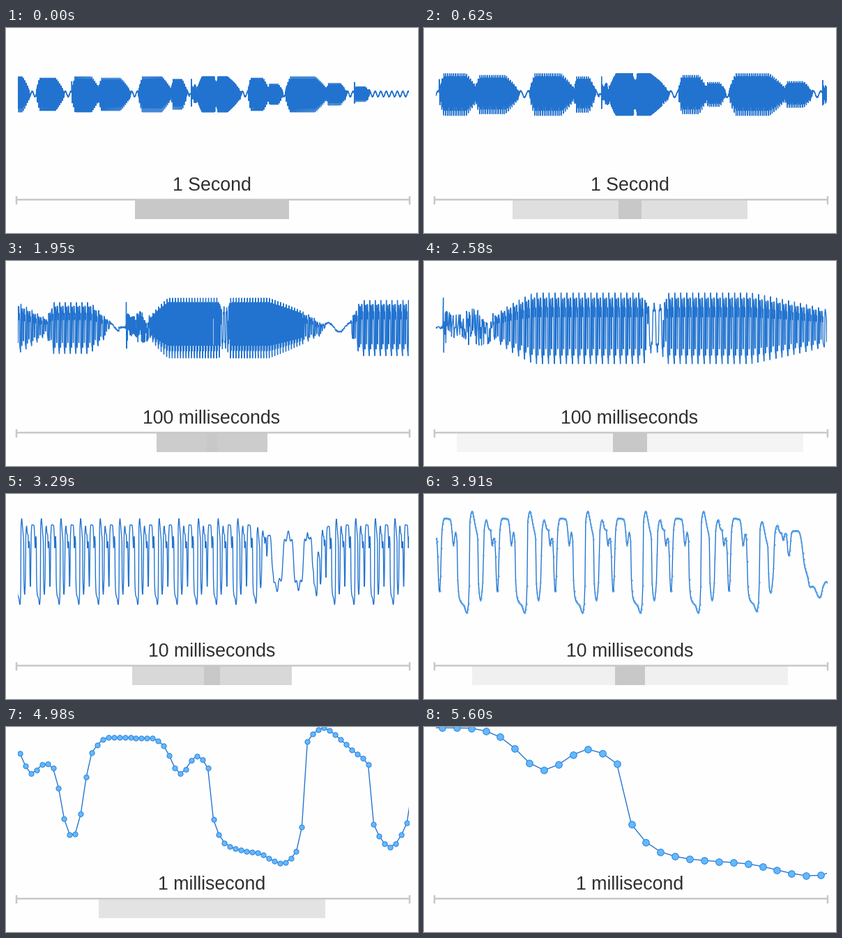
Write a matplotlib script that moves like this. It is 591x295 px and loops after 5690 ms.

```python
import numpy as np
import matplotlib.pyplot as plt
from matplotlib.animation import FuncAnimation
from matplotlib.patches import Rectangle

W, H, DPI = 591, 295, 100
LOOP, STEPS, TICKS = 5690, 64, 3    # ms, poses per loop, ticks per pose
PX = 72 / DPI                       # points per pixel
MID = 297.5                         # x that the zoom closes in on
LEFT, RIGHT, RULE_Y = 15, 580, 247.3
BLUE, DOT, RIM = "#2273cf", "#62b9fc", "#2e82dc"
GREY, INK = "#c8c8c8", "#2f2f32"
LABELS = ["1 Second", "100 milliseconds", "10 milliseconds", "1 millisecond"]

# Zoom: pixels per sample and width of the one-second box at some poses
KEYS = np.array([0, 13, 29, 37, 44, 56, 63])
RATIO = 10.3                        # size ratio of neighbouring boxes
LOG_SCALE = np.log([0.0124, 0.023, 0.106, 0.348, 1.025, 7.93, 20.9])
LOG_BOX = (np.log([221, 524, 496, 229, 453, 325, 900])
           + np.log(RATIO) * np.array([0, 0, 1, 2, 2, 3, 3]))

PERIOD = 81                         # samples in one pitch cycle
CYCLE = [(-35, .60), (-33, .30), (-30.5, .45), (-29, .38), (-26, -.59), (-25, -.58),
         (-22, .61), (-19, .83), (-11, .82), (-9, .71), (-6, .30), (-3, .56),
         (-1, .38), (0, -.37), (2, -.71), (4, -.80), (8, -.86), (12.5, -1.01),
         (15, -.84), (16, -.48), (17, .77), (20, .97), (22, .87), (25, .65),
         (28, .43), (29, -.44), (32, -.77), (35, -.42), (37, .60), (40, .80),
         (43.5, .62), (46, .60)]

# Start and end in thousands of samples, loudness
SYLLABLES = [(-24, -21.2, 1), (-20.5, -17.2, .92), (-16.4, -13, 1),
             (-13.4, -9.5, .92), (-8.7, -4.7, 1), (-4.9, -3, .85), (-1.95, 3.3, 1),
             (4, 6.6, .92), (6.3, 8.1, .58), (8.3, 13.4, 1), (13, 15.5, .62),
             (16.3, 18.2, .42)]
BURSTS = [-16.4, -2.55, 16.3]


def curve(x, xs, ys):
    """Smooth curve through key points that never overshoots them."""
    xs, ys = np.asarray(xs, float), np.asarray(ys, float)
    gap = np.diff(xs)
    d = np.diff(ys) / gap
    a, b = d[:-1], d[1:]
    same = a * b > 0
    inner = np.where(same, 2 * a * b / np.where(same, a + b, 1), 0)
    m = np.concatenate([d[:1], inner, d[-1:]])
    i = np.clip(np.searchsorted(xs, x, "right") - 1, 0, len(gap) - 1)
    h = gap[i]
    u = (x - xs[i]) / h
    return ((2 * u**3 - 3 * u**2 + 1) * ys[i] + (u**3 - 2 * u**2 + u) * h * m[i]
            + (3 * u**2 - 2 * u**3) * ys[i + 1] + (u**3 - u**2) * h * m[i + 1])


def voice(s):
    """Repeating pitch cycle, softer in a short stretch and slower far out."""
    lag = 14 * np.exp(-((s - 345) / 100) ** 2)
    far = np.sign(s) * np.maximum(abs(s) - 2600, 0) / 2
    phase = s - lag - far
    start = CYCLE[0][0]
    sharp = curve(start + (phase - start) % PERIOD, *zip(*CYCLE))

    turn = 2 * np.pi * (phase - 53.5) / PERIOD
    soft = .62 * np.tanh(1.8 * np.cos(turn)) + .1 * np.cos(5 * turn)
    mix = np.exp(-((s - 325) / 120) ** 4)
    return sharp + mix * (soft - sharp)


def loudness(t):
    env = np.full(t.shape, .03)
    for start, end, loud in SYLLABLES:
        size = end - start
        rise = np.clip((t - start) / (.12 * size), 0, 1) ** .6
        fall = np.clip((end - t) / (.32 * size), 0, 1) ** .7
        env = np.maximum(env, loud * rise * fall)
    for start in BURSTS:
        age = np.maximum(t - start, 0)
        env = np.maximum(env, (t >= start) * .9 * np.exp(-age / .12))
    return env


def build_wave(size=23200):
    s = np.arange(-size, size + 1)
    env = loudness(s / 1000)
    wave = voice(s)

    # A hissing consonant before the middle syllable
    rng = np.random.default_rng(4)
    hiss = (s > -2555) & (s < -1870)
    knots = np.arange(-2560, -1860, 7)
    wave[hiss] = np.interp(s[hiss], knots, rng.uniform(-1, 1, len(knots)))
    env[hiss] = np.maximum(env[hiss], .48 + .1 * np.cos(s[hiss] / 110))

    # Slow hum that shows in the pauses
    hum = np.clip(1 - env / .4, 0, 1) * (abs(s) > 2760)
    return s, wave * env + .16 * hum * np.sin(2 * np.pi * s / 640)


samples, wave = build_wave()

plt.rcParams["agg.path.chunksize"] = 10000
plt.rcParams["font.family"] = "Liberation Sans"
fig = plt.figure(figsize=(W / DPI, H / DPI), dpi=DPI, facecolor="#fefefe")
ax = fig.add_axes([0, 0, 1, 1])
ax.set_xlim(0, W)
ax.set_ylim(H, 0)
ax.axis("off")

boxes = [ax.add_patch(Rectangle((0, 248), 0, 27, lw=0, zorder=1 + i))
         for i in range(len(LABELS))]
for xs, ys in (([LEFT, RIGHT], [RULE_Y] * 2), ([LEFT] * 2, [241.5, 254]),
               ([RIGHT - .7] * 2, [241.5, 254])):
    ax.plot(xs, ys, color=GREY, lw=2.5 * PX, solid_capstyle="butt", zorder=6)
label = ax.text(295, 234.5, "", fontsize=26.8 * PX, color=INK, ha="center",
                va="baseline", zorder=8)
line, = ax.plot([], [], color=BLUE, lw=1.35 * PX, marker="o", mfc=DOT, mec=RIM,
                solid_joinstyle="round", zorder=7)
line.set_clip_path(Rectangle((17.3, 0), 561, H, transform=ax.transData))


def draw_wave(n):
    log_k = curve(n, KEYS, LOG_SCALE)
    k = np.exp(log_k)
    middle, height = 95 + 2 * n / 63, 25.8 * np.exp(.0239 * n)
    seen = abs(samples) <= 282 / k + 2
    line.set_data(MID + k * samples[seen], middle - height * wave[seen])
    radius = .95 + 1.27 * log_k
    line.set_markersize(2 * radius * PX if radius > .4 else 0)
    line.set_markeredgewidth(np.clip(.4 * radius, 0, 1) * PX)


def draw_boxes(n):
    full = RIGHT - LEFT
    widths = np.exp(curve(n, KEYS, LOG_BOX)) / RATIO ** np.arange(len(LABELS))
    level = min(int(np.sum(widths > full)), len(LABELS) - 1)
    label.set_text(LABELS[level])
    for i, (box, w) in enumerate(zip(boxes, widths)):
        box.set_visible(level <= i <= level + 1 and w <= full)
        box.set_x(295.5 - w / 2)
        box.set_width(w)
        solid = 221 if i == 0 else 150     # width at which fading starts
        fade = np.clip((w - solid) / (full - solid), 0, 1) ** .7
        box.set_facecolor([(200 + 50 * fade) / 255] * 3)


def update(tick):
    # Poses change in hard steps, one tick early
    n = min((tick + 1) // TICKS, STEPS - 1)
    draw_wave(n)
    draw_boxes(n)
    return [line, label, *boxes]


anim = FuncAnimation(fig, update, frames=STEPS * TICKS,
                     interval=LOOP / (STEPS * TICKS),
                     repeat=True, repeat_delay=0, blit=False)
plt.show()
```
